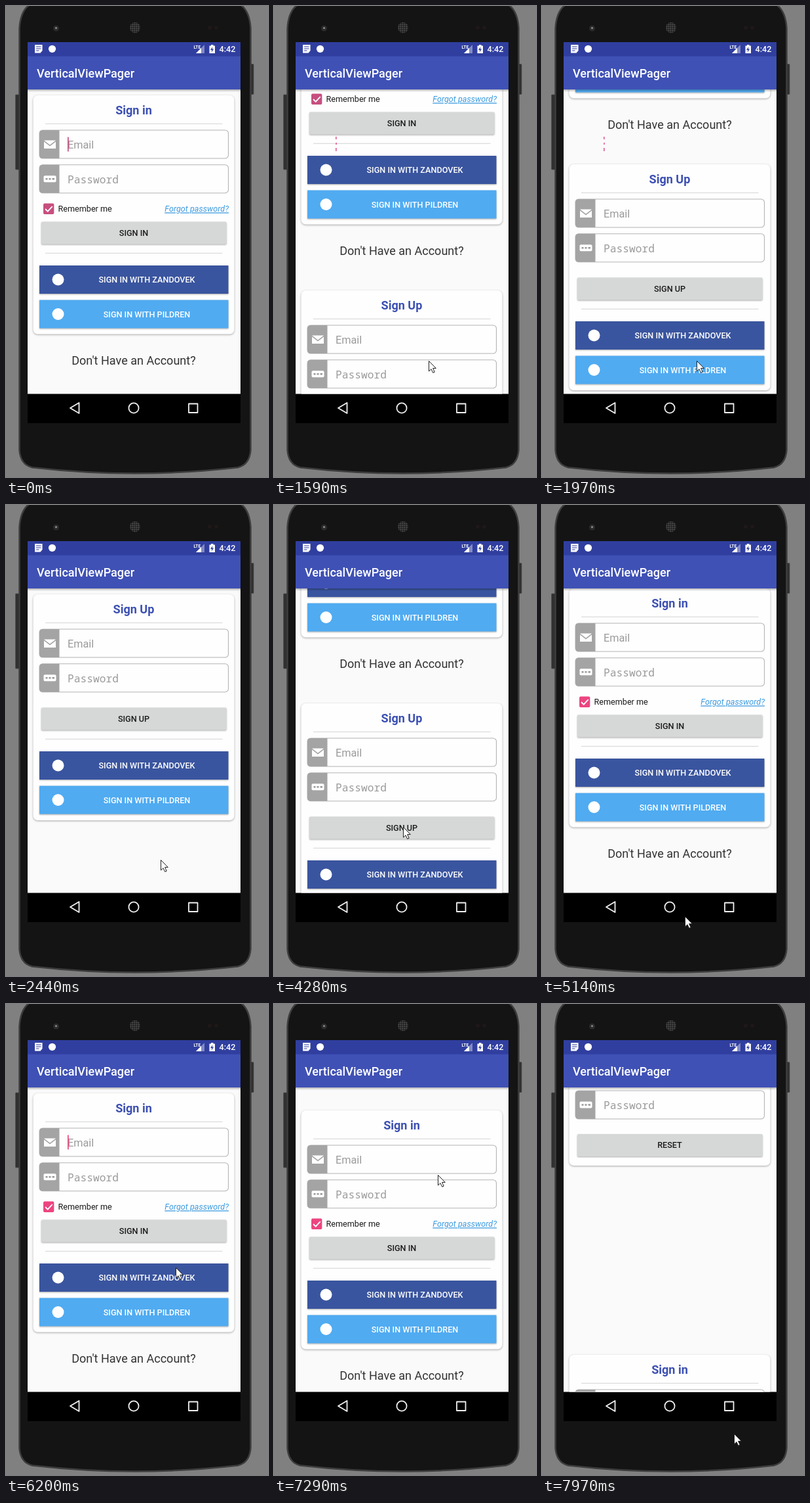
An HTML page that plays this animation: 400 px wide and 717 px high, repeating every 8 s.

```html
<!DOCTYPE html>
<html lang="en">
<head>
<meta charset="utf-8">
<title>VerticalViewPager</title>
<style>
  html, body { margin: 0; width: 100%; height: 100%; overflow: hidden; background: #808080; }
  svg { display: block; width: 100%; height: 100%; font-family: Roboto, sans-serif; }
  text { white-space: pre; }
  .heading { font-size: 18.06px; font-weight: 700; fill: #3c50b2; text-anchor: middle; }
  .hint { font-size: 16.25px; fill: #9b9b9b; }
  .mono { font-family: "Noto Sans Mono", monospace; }
  .label { font-size: 12.64px; fill: #1c1c1c; }
  .button { font-weight: 500; text-anchor: middle; }
  .link { font-style: italic; fill: #3c9be0; text-decoration: underline; text-anchor: end; }
  .rule { stroke: #dcdcdc; stroke-width: 1.2; }
  .card { fill: #fefefe; filter: drop-shadow(0 1px 1.4px #0005); }
  .raised { filter: drop-shadow(0 1px 1px #0005); }
  .accent { fill: var(--accent); }
</style>
</head>
<body>
<svg viewBox="0 0 400 717">
  <defs>
    <clipPath id="view"><rect x="33" y="127" width="325" height="463.5"/></clipPath>
    <linearGradient id="barShadow" x2="0" y2="1">
      <stop stop-color="#000" stop-opacity=".28"/><stop offset="1" stop-color="#000" stop-opacity="0"/>
    </linearGradient>
    <pattern id="mesh" width="3" height="3" patternUnits="userSpaceOnUse">
      <rect width="3" height="3" fill="#1d1d1d"/><circle cx="1.5" cy="1.5" r="1" fill="#5c5c5c"/>
    </pattern>
  </defs>

  <!-- phone -->
  <rect x="14.5" y="135" width="6" height="114" rx="1" fill="#303030" stroke="#4a4a4a" stroke-width=".8"/>
  <rect x="373" y="88.500" width="5" height="46" rx="1" fill="#303030" stroke="#4a4a4a" stroke-width=".8"/>
  <path d="M36-2Q22 8 20.500 34V676Q22 698 40 702.500Q120 711.500 197 711.500T354 702.500Q372 698 373.500 676V34Q372 8 358-2Z"
    fill="#141414" stroke="#3d3d3d" stroke-width="2.500"/>
  <circle cx="76.500" cy="34" r="4.500" fill="#2b2b2b"/><circle cx="76.500" cy="33.500" r="1.600" fill="#8a8a8a"/>
  <circle cx="197" cy="33" r="8" fill="url(#mesh)"/>
  <circle cx="311" cy="33" r="3" fill="#1f1718"/><circle cx="321" cy="33" r="3" fill="#1f1718"/>

  <!-- screen -->
  <rect x="33" y="55" width="325" height="580"/>
  <rect x="33" y="127" width="325" height="463.500" fill="#fafafa"/>
  <g clip-path="url(#view)">
    <g id="pages"></g>
    <path id="trace" d="M94.800 199v4M95 208v3M94.800 216v5" stroke="#e0508a" stroke-width="1.500"/>
    <rect x="33" y="127" width="325" height="4" fill="url(#barShadow)"/>
  </g>
  <rect x="33" y="55" width="325" height="22" fill="#303f9f"/>
  <rect x="33" y="76.500" width="325" height="50.500" fill="#3f51b5"/>
  <text x="47" y="108.500" font-size="18.060" font-weight="500" fill="#fff">VerticalViewPager</text>

  <!-- status bar -->
  <g fill="#fff">
    <path d="M44 59h11.500v9l-3 3.500H44Z"/>
    <path d="M46 62h7.500M46 65h7.500M46 68h4.500" stroke="#303f9f" stroke-width="1.200"/>
    <circle cx="70.500" cy="65.300" r="5.600"/>
    <path d="M303 59V72H290Z" opacity=".4"/><path d="M298 64V72H290Z"/>
    <text x="286.500" y="65" font-size="6.500" font-weight="700" textLength="">LTE</text>
    <path d="M310.500 60.500h2.500v-1.500h3.500v1.500h2.500V72h-8.500Z"/>
    <path d="M315.500 62l-3.500 5h2.300l-.6 3.500 3.500-5h-2.300Z" fill="#303f9f"/>
    <text x="325.500" y="70.300" font-size="12.640" font-weight="500">4:42</text>
  </g>

  <!-- navigation bar -->
  <g fill="none" stroke="#f0f0f0" stroke-width="1.800" stroke-linejoin="round">
    <path d="M98 612L111.500 604V620Z"/>
    <circle cx="195" cy="612" r="7.600"/>
    <rect x="279" y="605.500" width="13.500" height="13.500"/>
  </g>

  <path id="cursor" d="M.5.5V16L4 12.700 6.700 18.300 9.200 17.200 6.600 11.500H11.300Z" fill="#fff" stroke="#222"/>
</svg>

<script>
const DURATION = 8000, TICKS_PER_MS = 13 / 1000, PAGE = 464;
const $ = id => document.getElementById(id);

// Page parts
const rule = y => `<path class="rule" d="M60 ${y}H330.500"/>`;
const heading = text => `<text class="heading" x="195" y="164.500">${text}</text>` + rule(179.3);
const card = bottom => `<rect class="card" x="41.500" y="136" width="307" height="${bottom - 136}" rx="7"/>`;

const envelope = `<path d="M58 204.500h18l-9 7ZM58 206.500l9 7 9-7V217H58Z" fill="#fff"/>`;
const keypad = `<rect x="57.500" y="205.500" width="19" height="10" rx="2" fill="#fff"/>
  <path d="M60.500 210.500h3M65.500 210.500h3M70.500 210.500h3.500" stroke="#999" stroke-width="2.400"/>`;
const field = (y, icon, hint, style = '') => `<g transform="translate(0 ${y - 189})">
  <rect x="51" y="189" width="288.500" height="43" rx="5" fill="#fefefe" stroke="#b4b4b4" stroke-width="1.100"/>
  <path d="M81.500 189V232H56q-5 0-5-5V194q0-5 5-5Z" fill="#a4a4a4"/>${icon}
  <text class="hint ${style}" x="94" y="217">${hint}</text></g>`;
const emailField = y => field(y, envelope, 'Email');
const passwordField = y => field(y, keypad, 'Password', 'mono');

const button = (y, text) => `<rect class="raised" x="54" y="${y}" width="282.500" height="34" rx="1.500" fill="#d6d7d7"/>
  <text class="label button" x="195" y="${y + 21.4}">${text}</text>`;
const social = (y, color, name) => `<rect class="raised" x="51" y="${y}" width="288.500" height="43" fill="${color}"/>
  <circle cx="79.500" cy="${y + 21.5}" r="9" fill="#fff"/>
  <text class="label button" x="215" y="${y + 26}" style="fill:#fff">SIGN IN WITH ${name}</text>`;
const socials = y => rule(y - 18.7) + social(y, '#3a559f', 'ZANDOVEK') + social(y + 52.5, '#50abf1', 'PILDREN');

const resetPage = card(312) + passwordField(198) + button(264, 'RESET');

const signInPage = card(499.5) + heading('Sign in') + emailField(189) + passwordField(241.7) + `
  <rect id="caret" class="accent" x="94" y="199.500" width="1.700" height="22"/>
  <rect class="accent" x="57" y="300.500" width="16.300" height="16.500" rx="2"/>
  <path d="M60 309l3.700 3.700 7-7.500" fill="none" stroke="#fff" stroke-width="1.800"/>
  <text class="label" x="79.500" y="313.300">Remember me</text>
  <text class="label link" x="340" y="313.300">Forgot password?</text>` +
  button(328.5, 'SIGN IN') + socials(395) +
  `<text x="195" y="546" font-size="18.060" fill="#333" text-anchor="middle">Don't Have an Account?</text>`;

const signUpPage = card(480) + heading('Sign Up') + emailField(189) + passwordField(241.7) +
  button(308.5, 'SIGN UP') + socials(375);

$('pages').innerHTML = [resetPage, signInPage, signUpPage]
  .map((page, i) => `<g transform="translate(0 ${(i - 1) * PAGE})">${page}</g>`).join('');

// Motion, as [tick, value] keys joined by monotone cubic curves
const scrollKeys = [[-5, 0], [12, 0], [16, -167], [20, -320], [23, -424], [25, -453], [27, -PAGE], [46, -PAGE],
  [51, -298], [58, -106], [60, -37], [62, -9], [65, 0], [87, 0], [90, 26], [94, 215], [98, 385], [99, 398]];
const cursorX = [[-1, 326], [0, 320], [7, 236], [36, 236], [42, 199], [46, 199], [51, 197], [57, 218], [69, 218],
  [75, 260], [81, 246], [86, 244], [87, 244], [90, 250], [98, 291], [99, 293]];
const cursorY = [[-1, 722], [0, 702], [7, 540], [36, 540], [42, 201], [46, 201], [51, 490], [57, 626], [69, 626],
  [75, 430], [81, 276], [86, 216], [87, 216], [90, 260], [94, 478], [98, 639], [99, 654]];

function track(keys, tick) {
  const last = keys.length - 1;
  if (tick <= keys[0][0]) return keys[0][1];
  if (tick >= keys[last][0]) return keys[last][1];
  const i = keys.findIndex(key => key[0] > tick) - 1;
  const slope = k => (keys[k + 1][1] - keys[k][1]) / (keys[k + 1][0] - keys[k][0]);
  const tangent = k => {
    if (k === 0 || k === last) return 0;
    const a = slope(k - 1), b = slope(k);
    return a * b > 0 ? 2 * a * b / (a + b) : 0;
  };
  const [t0, v0] = keys[i], [t1, v1] = keys[i + 1];
  const span = t1 - t0, u = (tick - t0) / span, w = 1 - u;
  return v0 * w * w * (1 + 2 * u) + v1 * u * u * (1 + 2 * w)
    + span * u * w * (tangent(i) * w - tangent(i + 1) * u);
}

const within = (tick, ...ranges) => ranges.some(([from, to]) => tick >= from && tick < to);
const show = (id, on) => $(id).setAttribute('visibility', on ? 'visible' : 'hidden');
const move = (id, x, y) => $(id).setAttribute('transform', `translate(${x} ${y})`);

const start = performance.now();
function draw() {
  const time = (performance.now() - start) % DURATION;
  const tick = Math.floor((time - 340) * TICKS_PER_MS);
  move('pages', 0, Math.round(track(scrollKeys, tick)));
  move('cursor', Math.round(track(cursorX, tick)), Math.round(track(cursorY, tick)));
  show('caret', within(tick, [-5, 0], [7, 13], [71, 77], [84, 90]));
  show('trace', within(tick, [13, 23]));
  document.body.style.setProperty('--accent', tick < 24 ? '#c74f7f' : '#ec4580');
  requestAnimationFrame(draw);
}
draw();
</script>
</body>
</html>
```
